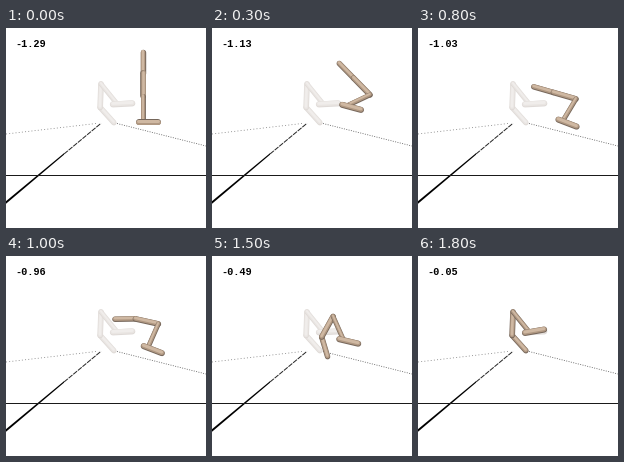
A matplotlib script that plays this animation: 200 px wide and 200 px high, repeating every 6.8 s.

```python
import numpy as np
import matplotlib.pyplot as plt
from matplotlib.animation import FuncAnimation

SIZE, DPI, STEP_MS, LOOP_MS = 200, 100, 100, 6800
PX = 72 / DPI

TORSO, THIGH, LEG, HEEL, TOE = 20.5, 23.5, 26, 4.5, 15
WIDTHS = (5.4, 5.6, 4.8, 6)

BODY = ("#75665a", "#b09882", "#cfb8a2")
GHOST = ("#dfdad7", "#e9e5e2", "#f0edeb")


def ramp(t, start, end, power=1):
    return np.clip((t - start) / (end - start), 0, 1) ** power


def smooth(u):
    return u * u * (3 - 2 * u)


def pose_at(t):
    """Knee position and screen angles: tip over, settle, then flip to the goal."""
    fall = ramp(t, 0, 500)
    swing = np.sin(fall * np.pi / 2)
    settle = ramp(t, 500, 800)
    flip = smooth(ramp(t, 800, 1800))
    knee = np.array([137 + 26 * swing - 5 * settle - 63 * ramp(t, 800, 1800, 1.5),
                     68 - 3 * fall ** 2 + 6 * settle - 15 * ramp(t, 800, 1800)])
    torso = -90 - 74 * fall - 148 * smooth(ramp(t, 800, 1750))
    thigh = -90 - 74 * fall - 104 * smooth(ramp(t, 900, 1800))
    leg = 90 + 80 * swing - 49 * settle - 70 * flip
    foot = 34 * fall ** 1.6 - 13 * settle - 31 * ramp(t, 1200, 1800, 2)
    return knee, torso, thigh, leg, foot


def score_at(t):
    return (-1.29 + 0.24 * ramp(t, 0, 500, 0.8) + 0.02 * ramp(t, 500, 800)
            + 0.98 * ramp(t, 800, 1800, 1.68))


def segments(knee, *angles):
    torso, thigh, leg, foot = (
        np.array([np.cos(a), np.sin(a)]) for a in np.radians(angles))
    hip = knee + THIGH * thigh
    ankle = knee + LEG * leg
    return ((hip, hip + TORSO * torso), (knee, hip), (knee, ankle),
            (ankle - HEEL * foot, ankle + TOE * foot))


class Hopper:
    def __init__(self, ax, colors, z):
        self.limbs = []
        for k, width in enumerate(WIDTHS):
            layers = [ax.plot([], [], color=c, lw=w * PX, zorder=z + k,
                              solid_capstyle="round")[0]
                      for c, w in zip(colors, (width, width - 1, width - 3))]
            self.limbs.append(layers)

    def pose(self, *pose):
        for layers, ends in zip(self.limbs, segments(*pose)):
            x, y = np.transpose(ends)
            for depth, line in enumerate(layers):
                line.set_data(x - 0.1 * depth, y - 0.5 * depth)


def draw_floor(ax):
    rng = np.random.default_rng(4)
    for y in (90, 93, 95.5, 97.5):
        x = rng.uniform(0, SIZE, 22)
        x = x[abs(x - 94) > 16]
        ax.scatter(x, y + rng.uniform(-0.8, 0.8, len(x)), s=0.5,
                   color="0.84", marker="s", lw=0)
    for start, end, gap, shade in (((0, 106), (90, 95.5), 4, "0.5"),
                                   ((111, 95.5), (200, 118), 3, "0.35")):
        ax.plot(*zip(start, end), color=shade, lw=0.8 * PX,
                dashes=(1.2, gap - 1.2), dash_capstyle="butt")
    # The near part of the diagonal is solid, the far part breaks up
    ax.fill([-1, 58, 58, -1], [174, 125.2, 126.7, 176.6], "k", lw=0)
    ax.plot([58, 95], [126, 95.3], color="0.15", lw=PX, dashes=(5, 1))
    ax.plot([0, SIZE], [147, 147], color="0.1", lw=PX)


fig = plt.figure(figsize=(SIZE / DPI, SIZE / DPI), dpi=DPI, facecolor="white")
ax = fig.add_axes([0, 0, 1, 1])
ax.set(xlim=(0, SIZE), ylim=(SIZE, 0))
ax.axis("off")

draw_floor(ax)
*goal, _ = pose_at(LOOP_MS)
Hopper(ax, GHOST, 3).pose(*goal, -3)
hopper = Hopper(ax, BODY, 10)
score = ax.text(9.5, 19, "", family="Liberation Mono", weight="bold",
                size=10.2 * PX, va="baseline", zorder=20)


def update(frame):
    t = frame * STEP_MS
    hopper.pose(*pose_at(t))
    score.set_text(f"{score_at(t):.2f}")


anim = FuncAnimation(fig, update, frames=LOOP_MS // STEP_MS,
                     interval=STEP_MS, repeat=True)
plt.show()
```
